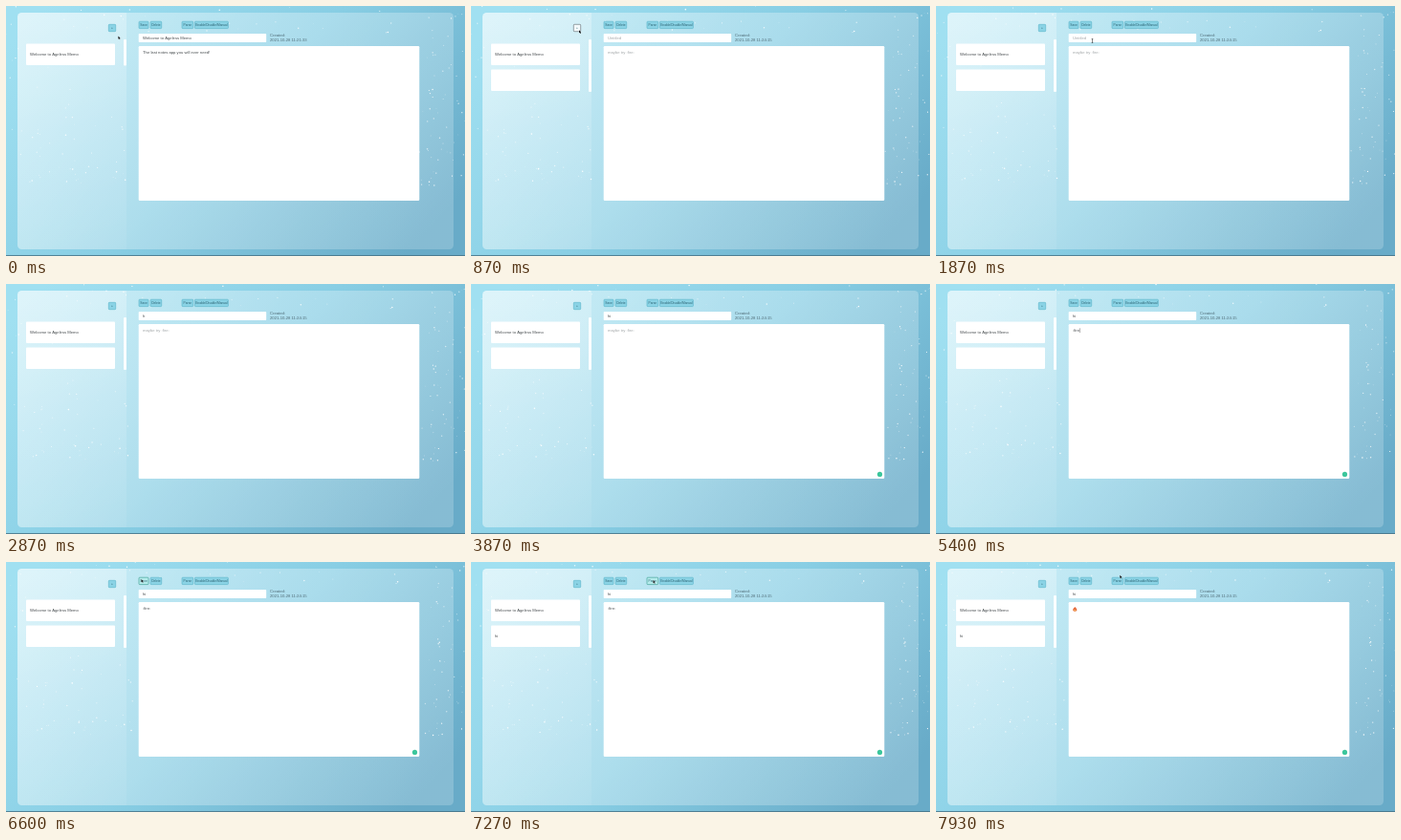
These frames come from a looping animation (480 px wide and 262 px high, 8000 ms). An HTML page with a canvas:

```html
<!DOCTYPE html>
<html lang="en">
<head>
<meta charset="utf-8">
<title>Notes</title>
<style>
html, body { margin: 0; width: 100%; height: 100%; overflow: hidden; background: #86cce2; }
canvas { display: block; width: 480px; height: 262px; }
</style>
</head>
<body>
<canvas id="stage"></canvas>
<script>
const W = 480, H = 262, LOOP = 8000, STEP = 1000 / 15;
const canvas = document.getElementById('stage');
const ctx = canvas.getContext('2d');
const dpr = window.devicePixelRatio || 1;
canvas.width = W * dpr;
canvas.height = H * dpr;
ctx.scale(dpr, dpr);

const FONT = '"Liberation Sans", Arial, sans-serif';
const INK = '#43484b', HINT = '#a2a6a8';

// Pointer stops: time, x, y
const PATH = [
  [0, 117.4, 31.5], [300, 116, 29], [560, 113, 25.2], [960, 113, 25.2],
  [1600, 163.5, 36.5], [2450, 163.5, 36.5],
  [5800, 163.5, 36.5], [6420, 141.5, 18], [6800, 141.5, 18],
  [7250, 190.5, 19], [7730, 190.5, 19], [7900, 192.5, 13.2], [8000, 192.5, 13.2]
];

function random(seed) {
  return () => {
    seed = (seed * 1664525 + 1013904223) >>> 0;
    return seed / 4294967296;
  };
}

// Flakes gather at the lower left, along the right side and across the top
const rnd = random(77);
const ZONES = [[0, 115, 125, 70], [432, 8, 48, 182], [432, 80, 48, 110], [60, 0, 400, 28], [0, 0, 125, 200]];
const flakes = Array.from({ length: 150 }, (_, i) => {
  const [x, y, w, h] = ZONES[i % ZONES.length];
  return { x: x + rnd() * w, y: y + rnd() * h, r: 0.3 + rnd() * 0.5, a: 0.35 + rnd() * 0.6,
           vx: 0.5 + rnd() * 1.1, vy: -0.4 - rnd() * 0.9 };
});

function gradient(x0, y0, x1, y1, ...stops) {
  const g = ctx.createLinearGradient(x0, y0, x1, y1);
  stops.forEach((c, i) => g.addColorStop(i / (stops.length - 1), c));
  return g;
}

function box(x, y, w, h, r, fill, line) {
  ctx.beginPath();
  ctx.roundRect(x, y, w, h, r);
  ctx.fillStyle = fill;
  ctx.fill();
  if (line) {
    ctx.strokeStyle = line;
    ctx.lineWidth = 0.6;
    ctx.stroke();
  }
}

function disc(x, y, r, fill) {
  ctx.beginPath();
  ctx.arc(x, y, r, 0, Math.PI * 2);
  ctx.fillStyle = fill;
  ctx.fill();
}

function text(s, x, y, color = INK, size = 4.2) {
  ctx.font = `${size}px ${FONT}`;
  ctx.fillStyle = color;
  ctx.fillText(s, x, y);
}

function button(label, x, y, w, h, fill = '#8ad3e5', line = '#58b2c8') {
  box(x, y, w, h, 0.8, fill, line);
  ctx.textAlign = 'center';
  text(label, x + w / 2, y + h / 2 + 1.1, '#2a6070', 3.25);
  ctx.textAlign = 'left';
}

function pointerAt(t) {
  let i = 0;
  while (i < PATH.length - 2 && t >= PATH[i + 1][0]) i++;
  const [t0, x0, y0] = PATH[i], [t1, x1, y1] = PATH[i + 1];
  const p = Math.min(1, (t - t0) / (t1 - t0));
  const e = p * p * (3 - 2 * p);
  return [x0 + (x1 - x0) * e, y0 + (y1 - y0) * e];
}

function inside([px, py], x, y, w, h) {
  return px >= x && px <= x + w && py >= y && py <= y + h;
}

function drawPointer(p) {
  const [x, y] = p;
  const beam = inside(p, 139, 29, 133, 9) || inside(p, 139, 42, 293, 162);
  ctx.save();
  ctx.translate(x, y);
  ctx.beginPath();
  if (beam) {
    ctx.moveTo(-0.8, -2); ctx.lineTo(0.8, -2);
    ctx.moveTo(0, -2); ctx.lineTo(0, 2);
    ctx.moveTo(-0.8, 2); ctx.lineTo(0.8, 2);
    ctx.strokeStyle = '#333';
    ctx.lineWidth = 0.6;
    ctx.stroke();
  } else {
    ctx.moveTo(0, 0);
    ctx.lineTo(0, 3.2);
    ctx.lineTo(0.8, 2.5);
    ctx.lineTo(1.4, 3.7);
    ctx.lineTo(2, 3.4);
    ctx.lineTo(1.4, 2.3);
    ctx.lineTo(2.3, 2.3);
    ctx.closePath();
    ctx.strokeStyle = '#ffffffaa';
    ctx.lineWidth = 0.5;
    ctx.stroke();
    ctx.fillStyle = '#101416';
    ctx.fill();
  }
  ctx.restore();
}

function drawFlame(x, y) {
  ctx.beginPath();
  ctx.moveTo(x, y - 2.6);
  ctx.quadraticCurveTo(x + 2.5, y - 0.6, x + 2.1, y + 0.9);
  ctx.quadraticCurveTo(x + 1.5, y + 2.2, x, y + 2.2);
  ctx.quadraticCurveTo(x - 1.8, y + 2.2, x - 2.2, y + 0.7);
  ctx.quadraticCurveTo(x - 2.2, y - 0.6, x, y - 2.6);
  ctx.fillStyle = '#e5683c';
  ctx.fill();
  disc(x, y + 1.1, 0.9, '#f6bd62');
}

function drawBackdrop(t) {
  ctx.fillStyle = gradient(60, -20, 390, 290, '#a0e0f1', '#88cee4', '#68abc8');
  ctx.fillRect(0, 0, W, H);
  box(12, 7, 456, 248, 4.5, gradient(12, 7, 400, 280,
    'rgba(255,255,255,.47)', 'rgba(255,255,255,.3)', 'rgba(255,255,255,.2)'));
  box(12, 7, 114, 248, [4.5, 0, 0, 4.5], gradient(12, 7, 126, 255,
    'rgba(255,255,255,.35)', 'rgba(255,255,255,.17)', 'rgba(255,255,255,.06)'));
  for (const f of flakes) {
    const s = t / 1000;
    disc(f.x + f.vx * s, f.y + f.vy * s, f.r, `rgba(255,255,255,${f.a})`);
  }
  ctx.fillStyle = '#426f82';
  ctx.fillRect(0, 261.2, W, 0.8);
}

function typed(s, t, start, gap) {
  return s.slice(0, Math.max(0, Math.floor((t - start) / gap) + 1));
}

function drawSidebar(t, p, added) {
  const look = inside(p, 107, 19, 8, 8) ? ['#f4fafc', '#5a6468'] : [];
  button('+', 107.3, 19.3, 7.4, 7.4, ...look);
  box(123, 35, 3, added ? 55 : 27.5, 0.8, 'rgba(255,255,255,.9)');
  box(21, 39.5, 93, 22.5, 1, '#fff');
  text('Welcome to Ageless Memo', 25, 51.6);
  if (added) {
    box(21, 66.5, 93, 22.5, 1, '#fff');
    if (t >= 6680) text('hi', 25, 78.8);
  }
}

function drawEditor(t, p, added) {
  const buttons = [['Save', 139, 10], ['Delete', 151, 11.7],
                   ['Parse', 184, 11.7], ['Enable/Disable/Manual', 197.4, 35]];
  for (const [label, x, w] of buttons) {
    const look = inside(p, x, 16, w, 8) ? ['#b4ecec', '#35998c'] : [];
    button(label, x, 16.2, w, 7.4, ...look);
  }

  box(138.7, 29, 133.5, 9, 0.8, '#fff');
  box(138.7, 42, 293.6, 162, 1.2, '#fff');
  text('Created:', 276, 32.2, '#4f6a75');
  text(added ? '2021-10-28 11:24:15' : '2021-10-28 11:21:33', 276, 37.1, '#4f6a75');

  if (!added) {
    text('Welcome to Ageless Memo', 143, 34.8);
    text('The last notes app you will ever need!', 143, 50);
    return;
  }

  const title = typed('hi', t, 2850, 240);
  text(title || 'Untitled', 143, 34.8, title ? INK : HINT);

  const body = typed(':fire:', t, 4550, 200);
  if (t >= 7650) drawFlame(145.3, 49.5);
  else text(body || 'maybe try :fire:', 143, 50, body ? INK : HINT);

  // Text caret follows the focused field
  const inTitle = t >= 1950 && t < 3600;
  const inBody = t >= 3950 && t < 6650;
  const blink = t % 1000 < 500 || (t >= 4550 && t < 5750);
  if ((inTitle || inBody) && blink) {
    ctx.font = `4.2px ${FONT}`;
    const x = 143.3 + ctx.measureText(inTitle ? title : body).width;
    ctx.fillStyle = '#555';
    ctx.fillRect(x, inTitle ? 31 : 46.3, 0.45, 4.8);
  }
  if (t >= 3600) disc(427.5, 199.4, 2.6, '#3cc69c');
}

function draw(t) {
  const p = pointerAt(t);
  const added = t >= 730;
  drawBackdrop(t);
  drawSidebar(t, p, added);
  drawEditor(t, p, added);
  if (t < 2850 || t >= 5750) drawPointer(p);
}

const start = performance.now();
function tick(now) {
  const t = Math.max(0, now - start) % LOOP;
  draw(Math.floor(t / STEP) * STEP);
  requestAnimationFrame(tick);
}
draw(0);
requestAnimationFrame(tick);
</script>
</body>
</html>
```
